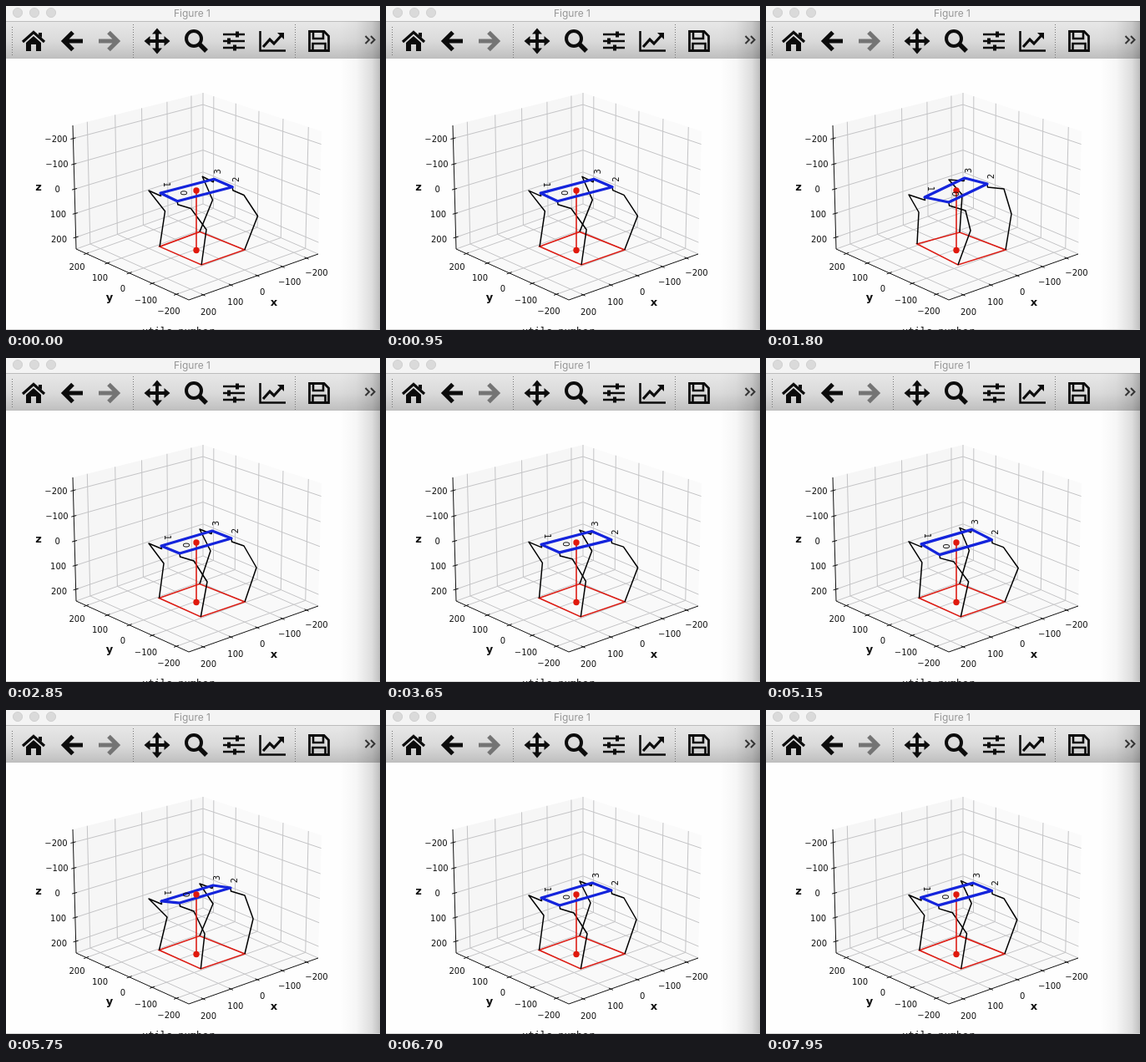
Write an HTML page that moves like this. It is 448 px wide and 388 px high and loops after 8000 ms.

```html
<!DOCTYPE html>
<html lang="en">
<head>
<meta charset="utf-8">
<title>Figure 1</title>
<style>
  html, body { margin: 0; width: 100%; height: 100%; overflow: hidden; background: #fefefe; }
  svg { display: block; width: 448px; height: 388px; }
  text { font-family: "DejaVu Sans", sans-serif; font-size: 10px; fill: #111; text-anchor: middle; }
  .axis { font-size: 13px; font-weight: bold; }
  .title { font: 12px Inter, sans-serif; fill: #969696; }
  .console { font: 12px "DejaVu Sans Mono", monospace; text-anchor: start; }
  .grid { stroke: #c4c4c6; stroke-width: 1; fill: none; }
  .edge { stroke: #111; stroke-width: 1; fill: none; }
  .icon { stroke: #0c0c0c; fill: none; stroke-width: 3.2; }
  .leg { stroke: #000; stroke-width: 1.5; fill: none; stroke-linejoin: round; }
  .red { stroke: #dc1c14; stroke-width: 1.6; fill: none; }
  .body { stroke: #1424dc; stroke-width: 3.2; fill: none; stroke-linejoin: round; }
</style>
</head>
<body>
<svg viewBox="0 0 448 388">
  <defs>
    <linearGradient id="bar" x2="0" y2="1">
      <stop offset="0" stop-color="#e8e8e8"/>
      <stop offset=".55" stop-color="#dadada"/>
      <stop offset="1" stop-color="#c0c0c0"/>
    </linearGradient>
    <linearGradient id="side">
      <stop offset="0" stop-opacity="0"/>
      <stop offset=".4" stop-opacity=".03"/>
      <stop offset=".8" stop-opacity=".13"/>
      <stop offset="1" stop-opacity=".25"/>
    </linearGradient>
  </defs>
  <rect width="448" height="388" fill="#fefefe"/>

  <rect width="448" height="19" fill="#f4f4f4"/>
  <g fill="#dadada" stroke="#c8c8c8" stroke-width=".7">
    <circle cx="14" cy="8" r="5.6"/><circle cx="34" cy="8" r="5.6"/><circle cx="54" cy="8" r="5.6"/>
  </g>
  <text class="title" x="223" y="13">Figure 1</text>
  <rect y="18" width="448" height="44" fill="url(#bar)"/>
  <path d="M0 18.5H448M0 62.5H448" stroke="#bcbcbc"/>
  <path d="M7.5 25V60M152.5 22V62M346.5 22V62" stroke="#777" stroke-dasharray="1 2"/>
  <rect x="400" y="18" width="48" height="370" fill="url(#side)"/>

  <g id="icons">
    <path d="M20 43L33 31.5L46 43" class="icon"/>
    <path d="M24 44L33 36L42 44V54H36V46H30V54H24ZM39 32H43V38L39 35Z" fill="#0c0c0c"/>
    <path d="M92 42H70M80 31.500L69.500 42L80 52.500" class="icon" style="stroke-width:5.2"/>
    <path d="M111 42H134M123 31.500L133.500 42L123 52.500" class="icon" style="stroke:#747474;stroke-width:5.2"/>
    <path d="M181 31V53M170 42H192" class="icon" style="stroke-width:3.8"/>
    <path d="M181 26.500L187 33.500H175ZM181 57.500L187 50.500H175ZM165.500 42L172.500 36V48ZM196.500 42L189.500 36V48Z" fill="#0c0c0c"/>
    <circle cx="225" cy="39" r="9" class="icon" style="stroke-width:4"/>
    <path d="M231.500 45.500L240 54" class="icon" style="stroke-width:5.5"/>
    <path d="M260 34H286M260 42H286M260 50H286" class="icon" style="stroke-width:2.6"/>
    <path d="M277 30.5V37.500M267 38.500V45.500M274 46.500V53.500" class="icon" style="stroke-width:4"/>
    <path d="M304.500 30V53.500H335" class="icon" style="stroke-width:2.5"/>
    <path d="M308 49L316 40L321 45L331 34" class="icon"/>
    <path d="M325 32H333V40Z" fill="#0c0c0c"/>
    <path d="M363.500 30.500H381L386.500 36V53.500H363.500Z" class="icon" style="stroke-width:2.8"/>
    <path d="M368 30V39H380V30M367.500 54V45H382.500V54" class="icon" style="stroke-width:2.6"/>
    <path d="M430.500 36L435 40.500L430.500 45M437 36L441.500 40.500L437 45" class="icon" style="stroke:#333;stroke-width:2"/>
  </g>

  <g id="axes"></g>
  <g id="robot"></g>
  <path d="M0 387.500H448" stroke="#d4d4d4"/>
  <text class="console" x="163" y="394">utils number</text>
</svg>

<script>
const NS = "http://www.w3.org/2000/svg";
const LOOP = 8000;
const axes = document.getElementById("axes");
const robot = document.getElementById("robot");

function add(parent, tag, attrs, text = "") {
  const node = document.createElementNS(NS, tag);
  for (const key in attrs) node.setAttribute(key, attrs[key]);
  node.textContent = text;
  return parent.appendChild(node);
}
const path = (points, closed) => "M" + points.map(p => p.join(" ")).join("L") + (closed ? "Z" : "");
const lerp = (a, b, k) => a.map((v, i) => v + (b[i] - v) * k);

// Corners of the plot box
const topLeft = [80, 143], topBack = [236, 104], topRight = [378, 150];
const lowLeft = [84, 291], lowBack = [236, 237], lowRight = [374, 297], lowFront = [219, 352];

// Five even ticks along an edge; depth is the ratio of distances at its ends
const ticks = depth => [.1, .3, .5, .7, .9].map(t => t / (t + depth * (1 - t)));

function drawAxes() {
  const xSteps = ticks(.89), ySteps = ticks(1.12), zSteps = ticks(.94);
  const line = (...points) => add(axes, "path", { d: path(points), class: "grid" });
  const tick = ([x, y], dx, dy) =>
    add(axes, "path", { d: `M${x - dx} ${y - dy}L${x + dx} ${y + dy}`, class: "edge" });
  const labels = (from, to, first, step) => {
    for (let i = 0; i < 5; i++) {
      const [x, y] = lerp(from, to, i / 4);
      add(axes, "text", { x, y: y + 3.7 }, String(first + i * step).replace("-", "\u2212"));
    }
  };

  [[topLeft, topBack, lowBack, lowLeft], [topBack, topRight, lowRight, lowBack],
   [lowLeft, lowBack, lowRight, lowFront]].forEach((pane, i) =>
    add(axes, "path", { d: path(pane, true), fill: ["#f6f6f6", "#fafafa", "#f9f9f9"][i] }));

  zSteps.forEach(k => line(lerp(topLeft, lowLeft, k), lerp(topBack, lowBack, k), lerp(topRight, lowRight, k)));
  xSteps.forEach(k => line(lerp(topLeft, topBack, k), lerp(lowLeft, lowBack, k), lerp(lowFront, lowRight, k)));
  ySteps.forEach(k => line(lerp(topBack, topRight, k), lerp(lowBack, lowRight, k), lerp(lowLeft, lowFront, k)));
  line(topBack, lowBack);
  line(lowLeft, lowBack, lowRight);
  add(axes, "path", { d: path([topLeft, lowLeft, lowFront, lowRight]), class: "edge" });

  zSteps.forEach(k => tick(lerp(topLeft, lowLeft, k), 3, -.8));
  xSteps.forEach(k => tick(lerp(lowFront, lowRight, k), 2.5, 1.2));
  ySteps.forEach(k => tick(lerp(lowLeft, lowFront, k), 3, -1.1));
  labels([60, 159], [63.5, 279.5], -200, 100);
  labels([242.5, 366], [372, 319], 200, -100);
  labels([85, 312.5], [195, 365], 200, -100);
  [["z", 39, 220.5], ["y", 124, 353], ["x", 321, 359]].forEach(([name, x, y]) =>
    add(axes, "text", { x, y, class: "axis" }, name));
}

// Each pose lists hip, elbow, knee and (where it moves) foot
const legs = [
  { name: 1, label: [7.5, -10], turn: 90, socket: [.5, 3.5],
    rest:  [[186, 225], [171, 222], [189, 246], [183.5, 287.5]],
    yaw:   [[190, 229], [171, 226], [183, 247], [181, 285]],
    pitch: [[186, 228], [171, 225], [192, 247]],
    roll:  [[186, 229], [171, 226], [193, 248]] },
  { name: 3, label: [4, -9], turn: -90, socket: [-1, 3.5],
    rest:  [[247, 207], [232, 205], [245, 231], [232, 270.5]],
    yaw:   [[238, 206], [219, 208], [235, 226], [232, 271]],
    pitch: [[248, 206], [232, 203], [242, 231]],
    roll:  [[248, 210], [232, 208], [248, 232]] },
  { name: 2, label: [4, -9], turn: -90, socket: [.5, 4],
    rest:  [[270, 216], [285, 225], [300, 251], [286, 292]],
    yaw:   [[265, 213], [285, 219], [294, 249], [287, 292]],
    pitch: [[270, 213], [286, 223], [297, 251]],
    roll:  [[269, 213], [286, 222], [296, 250]] },
  { name: 0, label: [8.5, -10], turn: -90, socket: [.5, 4],
    rest:  [[208, 234], [225, 243], [241, 268], [233.3, 310]],
    yaw:   [[219, 235], [239, 245], [245, 269], [230, 310]],
    pitch: [[208, 236], [228, 247], [244, 269]],
    roll:  [[208, 231], [225, 241], [238, 268]] }
];
const poses = ["yaw", "pitch", "roll"];

// time, yaw, pitch, roll: each swings one way, then the other
const steps = [
  [0, -.25, 0, 0], [550, -.6, 0, 0], [1800, 1, 0, 0], [2600, 0, 0, 0],
  [3000, 0, 0, 0], [3550, 0, -.6, 0], [4400, 0, 1, 0], [4850, 0, 0, 0],
  [5230, 0, 0, -.6], [5780, 0, 0, 1], [6300, 0, 0, 0], [6900, 0, 0, 0], [LOOP, -.12, 0, 0]
];

function weightsAt(time) {
  const i = steps.findIndex((s, n) => n && time <= s[0]);
  const from = steps[i - 1], to = steps[i];
  const k = (time - from[0]) / (to[0] - from[0]);
  return lerp(from, to, (1 - Math.cos(Math.PI * k)) / 2).slice(1);
}

function jointsOf(leg, weights) {
  return leg.rest.map((point, j) => point.map((v, c) =>
    poses.reduce((sum, pose, n) => {
      const goal = leg[pose][j];
      return goal ? sum + weights[n] * (goal[c] - v) : sum;
    }, v)));
}

drawAxes();
const base = add(robot, "path", { class: "red" });
legs.forEach(leg => leg.line = add(robot, "path", { class: "leg" }));
add(robot, "path", { d: "M228 221V292", class: "red" });
const frame = add(robot, "path", { class: "body" });
[221, 292.5].forEach(cy => add(robot, "circle", { cx: 228, cy, r: 3.7, fill: "#e0180c" }));
legs.forEach(leg => leg.text = add(robot, "text", { y: 3.7 }, leg.name));

function draw(now) {
  const weights = weightsAt(now % LOOP);
  const joints = legs.map(leg => jointsOf(leg, weights));
  legs.forEach((leg, i) => {
    const [hip, ...rest] = joints[i];
    const offset = d => hip.map((v, c) => v + d[c]);
    leg.line.setAttribute("d", path([hip, offset(leg.socket), ...rest]));
    leg.text.setAttribute("transform", `translate(${offset(leg.label)}) rotate(${leg.turn})`);
  });
  base.setAttribute("d", path(joints.map(j => j[3]), true));
  frame.setAttribute("d", path(joints.map(j => j[0]), true));
  requestAnimationFrame(draw);
}
requestAnimationFrame(draw);
</script>
</body>
</html>
```
